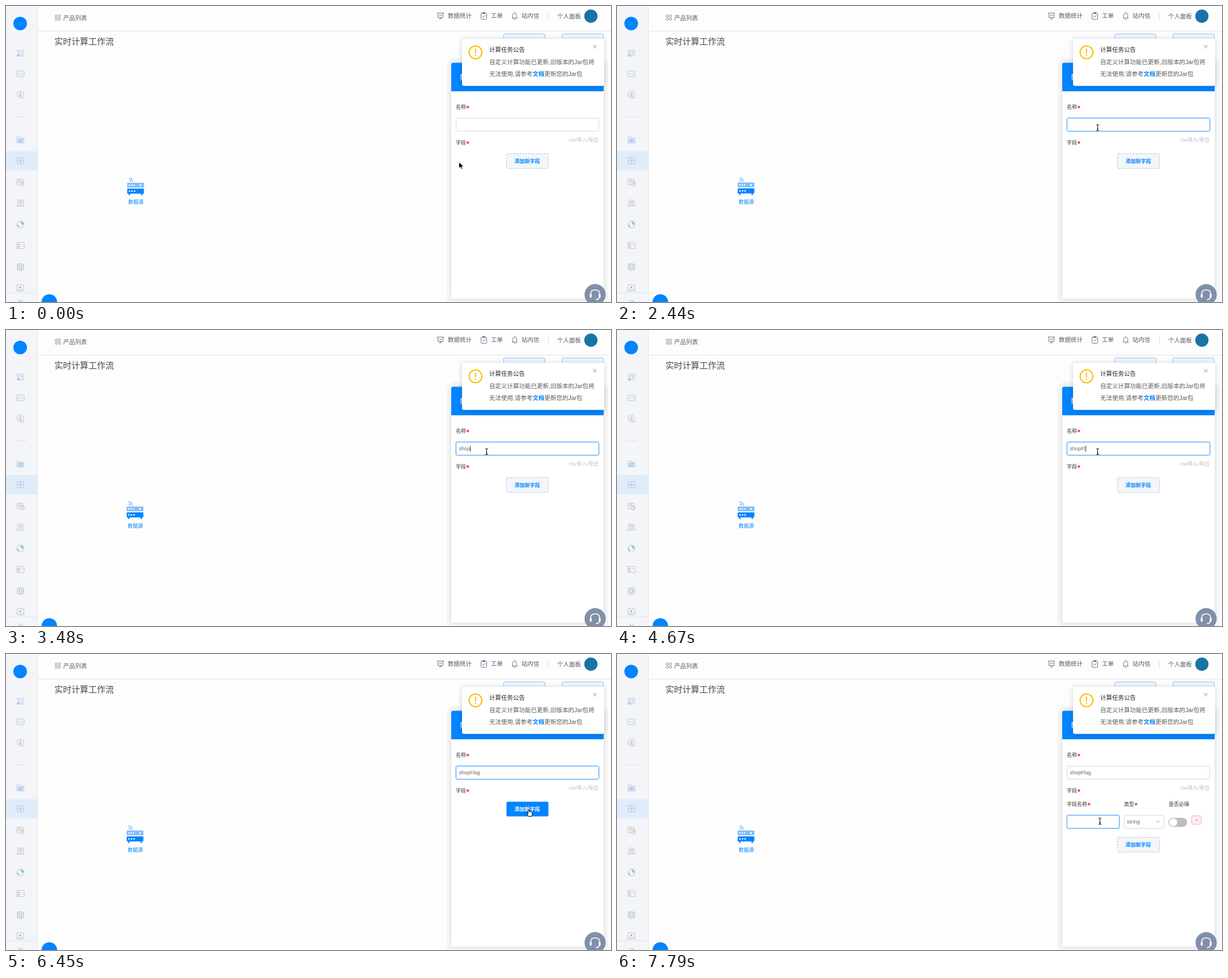
These frames come from a looping animation (1068x524 px, 8 s). An HTML page:

```html
<!DOCTYPE html>
<html lang="zh">
<head>
<meta charset="utf-8">
<style>
  html, body { margin: 0; width: 100%; height: 100%; overflow: hidden; background: #fdfdfd; }
  svg { display: block; width: 1068px; height: 524px; }
  text { font-family: "Liberation Sans", "Noto Sans CJK SC", "Noto Sans CJK", sans-serif; white-space: pre; }
  .toast { filter: drop-shadow(0 1.5px 4px rgba(0, 0, 0, .18)); }
  .panel { filter: drop-shadow(0 0 3px rgba(0, 0, 0, .12)); }
  .glow { filter: drop-shadow(0 0 1px rgba(0, 132, 255, .45)); }
</style>
</head>
<body>
<svg id="stage" viewBox="0 0 1068 524" fill="none"></svg>
<script>
const BLUE = '#0084ff', INK = '#555b66', ICON = '#6b7a92', PALE = '#b5c5dc', WARM = '#eba58f';

// Text is placed by its left edge and vertical centre.
const text = (x, cy, size, fill, str, more = '') =>
  `<text x="${x}" y="${cy + size * .37}" font-size="${size}" fill="${fill}" ${more}>${str}</text>`;
const rect = (x, y, w, h, fill, more = '') =>
  `<rect x="${x}" y="${y}" width="${w}" height="${h}" fill="${fill}" ${more}/>`;
const circle = (x, y, r, fill, more = '') =>
  `<circle cx="${x}" cy="${y}" r="${r}" fill="${fill}" ${more}/>`;
const ring = (x, y, r, color) => circle(x, y, r, 'none', `stroke="${color}"`);
const line = (d, stroke, width = 1, more = '') =>
  `<path d="${d}" stroke="${stroke}" stroke-width="${width}" ${more}/>`;
const group = (x, y, body, id = '') => `<g id="${id}" transform="translate(${x} ${y})">${body}</g>`;
const box = (x, y, w, h, color, r = 1) => rect(x, y, w, h, 'none', `rx="${r}" stroke="${color}"`);
const label = (x, cy, str) => text(x, cy, 9, '#333', str) +
  group(x + str.length * 9 + 3.3, cy + .3,
    line('M0-2.4V2.4M-2.1-1.2L2.1 1.2M-2.1 1.2L2.1-1.2', '#f04134', 1.3));
const field = (id, x, y, w) => rect(x, y, w, 23, '#fff', `id="${id}" rx="2" stroke="#d6d9de"`);

function sidebar() {
  const icons = [
    [83, ring(-3.5, -3, 2.5, PALE) + ring(3.5, -3, 2.5, PALE) +
      line('M-3.5 1L-6 5.5H-1Z', '#6ba7ee') + box(1.2, 1, 4.6, 4.6, PALE, 2)],
    [120, box(-6.5, -5, 13, 10, PALE) + line('M-4 2L-2.3-2L-.6 2M1.5-1H4.5M1.5 1.5H4.5', PALE, .8)],
    [157, ring(0, -.5, 6, PALE) + ring(0, -2, 1.6, WARM) +
      line('M-2.5 2.5Q0-1 2.5 2.5Z', WARM) + line('M1 6H7', PALE)],
    [237, line('M-6 5.5V-5H-1L0-3H6V5.5Z', PALE) + box(-3.5, -1, 7, 4.5, '#7fb0ea', 0) +
      line('M-3.5 1H3.5M0-1V3.5', '#7fb0ea', .7)],
    [274, box(-5.5, -5.5, 11, 11, PALE) + line('M-7 0H-4M4 0H7M0-6V-3M0 3V6', PALE) +
      line('M-2 0L0-2L2 0L0 2Z', '#86a9d6')],
    [312, box(-6, -5.5, 11, 4, PALE) + box(-6, -1.5, 11, 6, PALE) + line('M-4-3.5H1M-4 1H-1', PALE) +
      circle(3.5, 3, 3.3, '#f4f6f9', `stroke="${WARM}"`) + line('M3.5 1V3H5.5', WARM)],
    [349, box(-5, -5.5, 10, 8.5, PALE) + line('M-6.5 5.5H6.5V3M-6.5 5.5V3', PALE) + box(-2, -3, 4, 3, WARM, 0)],
    [387, ring(0, 0, 6.2, '#b5c5cf') + '<path d="M0-6Q5-6 6-1L3 1L1-2ZM-6 0L-3 1L-2 5Q-6 4-6 0" fill="#8fd49b"/>'],
    [424, box(-6.5, -5.5, 13, 11, PALE) + ring(-3, -1.5, 1.3, '#e67f71') +
      line('M-5 2.5H-1', '#e67f71') + line('M1-1H4', PALE)],
    [462, box(-5, -5, 10, 10, '#a6b0be') + box(-2.2, -2.2, 4.4, 4.4, '#a6b0be', 0) +
      line('M-3-5V-7M0-5V-7M3-5V-7M-3 5V7M0 5V7M3 5V7M-5-3H-7M-5 0H-7M-5 3H-7M5-3H7M5 0H7M5 3H7', '#c0c8d2', .8)],
    [499, box(-6, -5.5, 12, 11, PALE) + line('M-6 3H6', PALE) + '<path d="M-1.5-3L2-1L-1.5 1Z" fill="#e67f71"/>'],
  ];
  return rect(0, 0, 55, 524, '#f3f5f9') + rect(0, 257, 55, 34, '#dfecfa') +
    line('M55.5 0V524M0 507.5H55', '#e2e6ec') + line('M16 196.5H36', '#d9dee6') +
    circle(25, 31, 12, BLUE) +
    icons.map(([y, body]) => group(25.5, y, body)).join('') +
    line('M22 520L25 523L22 526M26 520L29 523L26 526', '#98a4b5');
}

function topbar() {
  return line('M56 44.5H1068', '#e3e5e8') +
    [[87, 16], [92.5, 16], [87, 21.5], [92.5, 21.5]].map(([x, y]) => box(x, y, 3.6, 3.6, '#8793a6', .5)).join('') +
    text(101, 21, 10.5, INK, '产品列表') +
    line('M761 12.5H773M762.5 12.5V20.5H771.5V12.5M764.5 18L766.5 15.5L768 17.5L770 15M765 24L767 21L769 24', ICON) +
    text(780, 17.5, 10.5, INK, '数据统计') +
    box(838.5, 12.5, 10, 11, ICON) + line('M841.5 11.5H845.5V13.5H841.5ZM841 18L843 20L846.5 16', ICON) +
    text(856, 17.5, 10.5, INK, '工单') +
    line('M893 21.5H903M894.5 21.5V16.5Q894.5 12.5 898 12.5Q901.5 12.5 901.5 16.5V21.5M896.5 23.7H899.5M898 11V12.5', ICON) +
    text(910, 17.5, 10.5, INK, '站内信') + line('M957.5 12V25', '#dcdfe4') +
    text(973, 18.5, 10.5, INK, '个人面板') + circle(1032.5, 18, 11.7, '#1874a6') +
    text(85.5, 62.3, 15, '#4a4a4a', '实时计算工作流');
}

function source() {
  const dots = (xs, y, r) => xs.map(x => circle(x, y, r, '#fff')).join('');
  return group(0, 0,
    rect(214, 313, 29.5, 8.3, '#7fbdfb', 'rx="1"') + dots([218, 222, 226], 317.2, 1.3) + dots([237.5], 317.2, 1.6) +
    rect(214, 323.3, 29.5, 9, BLUE, 'rx="1"') + dots([218, 222.5, 227], 327.8, 1.4) +
    rect(216.5, 332, 2.5, 3, BLUE) + rect(238.5, 332, 2.5, 3, BLUE) +
    line('M217.5 308.3Q220.2 308.6 220.3 311.5M217 304.6Q223.6 305 223.7 311.5', '#5faaf7', 1.2) +
    text(215.7, 347, 9, BLUE, '数据源'), 'source');
}

function panel() {
  return rect(777.5, 92, 286, 440, '#f5f5f5', 'rx="14"') +
    [879, 982].map(x => rect(x - .5, 49.5, 73, 24, '#eef6ff', 'rx="2" stroke="#8fc0f5"')).join('') +
    rect(786, 100.5, 269, 417.5, '#fff', 'rx="3" class="panel"') +
    `<path d="M786 151V103.5Q786 100.5 789 100.5H1052Q1055 100.5 1055 103.5V151Z" fill="${BLUE}"/>` +
    text(801, 127, 12, '#fff', '数据源') +
    label(794, 178.5, '名称') + field('name', 794.5, 198.5, 252) +
    text(799.5, 210, 9, '#666', '', 'id="typed"') +
    text(994, 236.5, 9, '#b4bac4', 'csv导入/导出') + label(794, 241.5, '字段') +
    group(0, 0,
      label(794, 265.5, '字段名称') + label(895, 265.5, '类型') + text(974, 265.5, 9, '#333', '是否必填') +
      field('key', 794.5, 285.5, 92) + field('kind', 895.5, 285.5, 70) + text(900, 296.7, 9.4, '#666', 'string') +
      line('M952 295.3L954.7 298L957.4 295.3', '#888') +
      rect(973.5, 290, 33, 16, '#bdbdbd', 'rx="8"') + circle(982, 298, 7, '#fff') +
      rect(1014.5, 286.5, 17, 15, '#fdecef', 'rx="2" stroke="#f3b0ba"') + line('M1021.3 294.5H1025', '#e8505f'), 'row') +
    group(0, 0,
      rect(883.5, 261.5, 74, 26, '#f3f6fa', 'rx="2" id="addBox"') +
      text(897.7, 274.5, 9, BLUE, '添加新字段', 'font-weight="600" id="addText"'), 'add') +
    line('', '#333', 1, 'id="caret"');
}

function notice() {
  return rect(805, 58, 251, 83.5, '#fff', 'rx="3" class="toast"') +
    circle(828.8, 82, 11.3, 'none', 'stroke="#fbbd08" stroke-width="2"') +
    line('M828.8 75.5V84', '#fbbd08', 2) + circle(828.8, 87.3, 1.2, '#fbbd08') +
    line('M1036.5 69L1042.3 74.8M1042.3 69L1036.5 74.8', '#8c8c8c') +
    text(853, 77.5, 10.5, '#262626', '计算任务公告') +
    text(853, 98.7, 10.5, '#595959', '自定义计算功能已更新,旧版本的Jar包将') +
    text(853, 119.7, 10.5, '#595959',
      `无法使用,请参考<tspan fill="${BLUE}" font-weight="600">文档</tspan>更新您的Jar包`);
}

function corners() {
  return circle(76.5, 524, 13.7, BLUE) + circle(1040, 511, 18.7, '#8190aa') +
    line('M1032 513V510Q1032 502.5 1040 502.5Q1048 502.5 1048 510V513Q1048 519.5 1041 520', '#fff', 1.7) +
    rect(1030.5, 509.5, 3.4, 7, '#fff', 'rx="1.5"') + rect(1046.3, 509.5, 3.4, 7, '#fff', 'rx="1.5"');
}

const BEAM = 'M-2.5-5.5Q0-5.5 0-4V4Q0 5.5-2.5 5.5M2.5-5.5Q0-5.5 0-4M0 4Q0 5.5 2.5 5.5M-1.3 2.5H1.3';
const pointers = {
  arrow: '<path d="M0 0V11.5L2.7 9L4.5 13L6.6 12.1L4.9 8.2H8.5Z" fill="#000" stroke="#fff"/>',
  beam: line(BEAM, '#fff', 2.4, 'stroke-opacity=".7"') + line(BEAM, '#111', 1.1),
  hand: '<path d="M-2.3 1V-4.5Q-1.3-6-.3-4.5V-1.5Q1-2.3 1.7-1Q3-1.6 3.5-.3Q5-.6 5 1V3.5L3.7 7H-1.5L-4.6 2.5Q-4.8.5-2.3 2.3Z" fill="#fff" stroke="#000"/>',
};

const stage = document.getElementById('stage');
stage.innerHTML = topbar() + source() + panel() + notice() + sidebar() + corners() + '<g id="pointer"/>';
const $ = id => document.getElementById(id);

const WORD = 'shopFlag';
const KEYS = [2730, 2880, 3180, 3480, 4370, 4670, 4820, 4970];
const CARET = [[940, 1390], [1840, 2440], [2730, 3930], [4370, 5570], [6020, 6450], [7340, 7790]];
const PATH = [
  [0, 799.5, 276], [140, 806, 268], [290, 820, 250], [440, 836, 231], [600, 845, 219], [770, 848.5, 215.5],
  [5570, 849.5, 216.2], [5720, 853, 220], [5870, 865, 232], [6020, 885, 250], [6150, 906, 266], [6300, 920, 277],
  [6450, 924, 280.5], [6750, 917, 282], [6900, 893, 288], [7040, 866, 294], [7190, 852.5, 296],
];

function set(id, attrs) {
  for (const k in attrs) $(id).setAttribute(k, attrs[k]);
}

function focus(id, t, from, to) {
  const on = t >= from && t < to;
  set(id, { stroke: on ? '#40a0ff' : '#d6d9de', class: on && t >= from + 150 ? 'glow' : '' });
}

function draw(t) {
  const [, x, y] = PATH.filter(p => p[0] <= t).pop();
  const open = t >= 6600;
  const inside = (l, r, top, bottom) => x > l && x < r && y > top && y < bottom;
  const hover = !open && inside(883, 957, 261, 288);
  const beam = inside(794, 1047, 198, 222) || open && inside(794, 887, 285, 309);

  set('source', { transform: t < 140 ? '' : 'translate(-1 -.5)' });
  focus('name', t, 940, 6750);
  focus('key', t, 7340, 8000);

  $('typed').textContent = WORD.slice(0, KEYS.filter(k => k <= t).length);
  const shown = CARET.some(([a, b]) => t >= a && t < b);
  const inKey = t >= 7340;
  const cx = inKey ? 800.5 : Math.floor(800 + $('typed').getComputedTextLength()) + .5;
  set('caret', { d: shown ? `M${cx} ${inKey ? 291 : 205}v10.5` : '' });

  set('row', { visibility: open ? 'visible' : 'hidden' });
  set('add', { transform: `translate(0 ${open ? 63 : 0})` });
  set('addBox', {
    fill: hover ? BLUE : '#f3f6fa',
    stroke: hover ? 'none' : '#a9c0dc',
    'stroke-dasharray': '3 2',
  });
  set('addText', { fill: hover ? '#fff' : BLUE });

  $('pointer').innerHTML = pointers[beam ? 'beam' : hover ? 'hand' : 'arrow'];
  set('pointer', { transform: `translate(${x} ${y})` });
}

const start = performance.now();
function tick() {
  draw((performance.now() - start) % 8000);
  requestAnimationFrame(tick);
}
tick();
</script>
</body>
</html>
```
